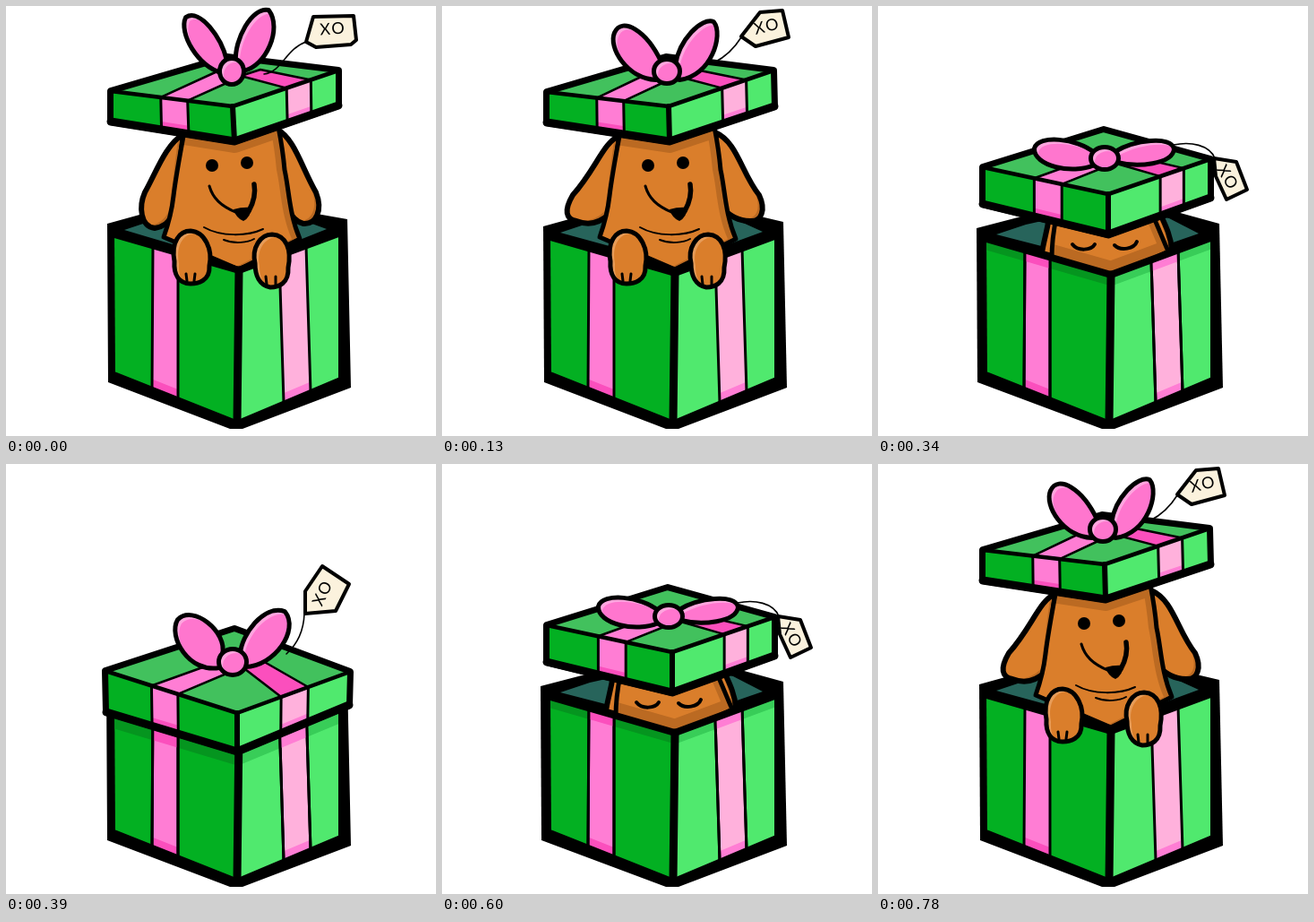
An HTML page with a canvas that plays this animation: 480 by 480 pixels, repeating every 910 ms.

```html
<!DOCTYPE html>
<html>
<head>
<meta charset="utf-8">
<style>
html, body { margin: 0; height: 100%; overflow: hidden; background: #fff }
canvas { display: block; width: 480px; height: 480px }
</style>
</head>
<body>
<canvas id="stage" width="480" height="480"></canvas>
<script>
const ctx = document.getElementById('stage').getContext('2d');
const GREEN = '#03b022', LIGHT_GREEN = '#50e96e', LID_TOP = '#42c15d';
const PINK = '#ff7dd4', PALE_PINK = '#ffb1dc', HOT_PINK = '#fb4fbd';
const BROWN = '#da7e2b', DARK_BROWN = '#bb6a22', LIGHT_BROWN = '#e79c58';

const openFace = {
  head: 'M199 140C193 172 189 195 187 212C185 230 181 244 176 258L260 294 328 260C316 232 316 205 311 183Q309 160 304 135Z',
  eyes: [[230, 178], [269, 175]],
  mouth: ['M227 201C231 215 240 223 256 230', 'M277 199C279 210 276 220 271 229'],
  nose: 'M254 227Q264 224 274 225Q273 236 265 240Q257 237 254 227Z',
  chin: 'M221 247C240 258 270 257 287 249M243 261C255 266 270 264 277 260',
  paws: ['M188 285C184 263 194 251 206 251C222 252 231 272 227 290C228 307 214 310 206 310C193 310 187 300 188 285Z',
         'M278 287C274 270 284 255 297 255C313 256 319 272 315 292C316 310 304 314 295 314C283 312 278 301 278 287Z'],
  toes: 'M201 299L202 307M211 299L210 307M290 302L291 311M301 302L301 311'
};

// lid: left, back, right, front top corners, then left, front, right bottom corners
const poses = {
  high: {
    rim: 0, side: 0,
    lid: [[117, 95], [247, 57], [371, 72], [253, 112], [117, 129], [255, 151], [371, 111]],
    knot: [252, 73, 13, 14],
    bow: ['M241 74C215 68 193 30 201 13C216 3 240 35 246 61Z',
          'M257 62C255 38 275 1 293 5C308 25 290 67 265 72Z'],
    tag: [[335, 40], [343, 12], [388, 11], [391, 38], [385, 43], [346, 46]],
    text: [365, 26, -4], string: 'M288 76C308 74 312 48 335 40',
    dog: { ...openFace, ears: [
      'M198 143C178 155 168 185 155 208C148 224 150 246 166 248Q180 246 187 232Z',
      'M303 138C322 148 330 180 346 208C354 228 346 244 332 243Q322 241 314 226Z'] }
  },
  up: {
    rim: 3, side: 0,
    lid: [[117, 96], [250, 57], [370, 72], [253, 112], [117, 130], [254, 151], [371, 112]],
    knot: [251, 73, 14, 13],
    bow: ['M239 82C206 80 186 46 193 30C201 12 228 28 244 62Z',
          'M261 66C265 38 290 13 303 18C314 32 300 78 265 82Z'],
    tag: [[334, 34], [355, 7], [380, 5], [387, 35], [350, 45]],
    text: [363, 23, -14], string: 'M304 63Q322 54 334 35',
    dog: { ...openFace, ears: [
      'M198 145C180 152 172 182 146 211C136 228 138 238 150 240Q170 248 187 232Z',
      'M305 141C330 152 334 186 354 211C362 228 356 240 346 240Q326 241 312 224Z'] }
  },
  peek: {
    rim: 5, side: -3, shade: 12,
    lid: [[117, 180], [252, 138], [371, 171], [257, 210], [117, 221], [257, 255], [371, 214]],
    knot: [253, 170, 15, 12],
    bow: ['M241 164C222 148 179 144 175 159C174 178 217 188 241 177Z',
          'M265 163C286 150 328 145 330 160C328 176 290 180 267 174Z'],
    tag: [[375, 170], [400, 174], [412, 205], [389, 216], [377, 190]],
    text: [390, 192, 58], string: 'M330 155C349 151 370 155 376 170',
    dog: {
      head: 'M199 236C195 255 194 265 194 282L260 304 324 274C317 258 312 245 306 232Z',
      ears: ['M191 236C188 255 185 262 183 276L205 282 205 236Z',
             'M315 232C322 247 327 258 328 272L312 276 305 232Z'],
      lids: 'M217 266C223 274 238 273 242 266M264 267C271 274 286 271 289 263'
    }
  },
  shut: {
    rim: 0, side: -1, shade: 15, closed: true, split: [.35, .55, .39, .63],
    lid: [[111, 231], [255, 184], [384, 232], [258, 278], [112, 277], [258, 321], [383, 269]],
    knot: [253, 221, 15, 14],
    bow: ['M238 227C205 233 181 193 192 174C209 157 247 188 241 212Z',
          'M262 212C263 191 288 157 311 165C327 185 300 225 267 226Z'],
    tag: [[334, 142], [353, 114], [383, 134], [368, 164], [334, 167]],
    text: [354, 144, -64], string: 'M313 212Q332 195 333 167'
  },
  rise: {
    rim: 1, side: 0,
    lid: [[117, 128], [252, 86], [369, 112], [253, 152], [117, 166], [256, 190], [370, 152]],
    knot: [253, 111, 15, 12],
    bow: ['M239 106C222 85 188 78 180 93C177 114 207 123 239 117Z',
          'M267 102C285 87 318 83 323 97C321 115 289 122 269 115Z'],
    tag: [[364, 95], [390, 88], [409, 115], [394, 135], [366, 112]],
    text: [384, 111, 40], string: 'M328 94Q348 91 364 95',
    dog: {
      head: 'M196 175C194 205 192 235 187 270L260 297 322 270C318 240 320 205 312 175Z',
      ears: ['M188 183C178 205 171 233 174 263L195 270 203 183Z',
             'M318 176C328 203 336 230 334 257L312 262 305 176Z'],
      lids: 'M217 210C223 219 238 217 240 210M264 212C271 219 285 215 288 208',
      mouth: ['M230 238C233 255 244 264 254 267', 'M281 235C280 250 275 262 268 273'],
      nose: 'M249 267Q259 264 270 269Q266 281 258 281Q251 277 249 267Z',
      paws: ['M183 289C177 259 208 240 224 260C235 277 220 283 207 280C204 292 190 299 183 289Z',
             'M277 277C279 256 309 245 321 266C328 286 320 300 306 296C298 291 296 281 277 277Z'],
      toes: 'M210 262L219 265M208 270L217 273M284 263L293 266M285 271L294 273'
    }
  }
};
const sequence = ['high', 'up', 'peek', 'shut', 'peek', 'rise', 'up'];
const STEP = 130;

const poly = (...pts) => new Path2D('M' + pts.join('L') + 'Z');
const line = (...pts) => new Path2D('M' + pts.join('L'));
const mix = (a, b, t) => [a[0] + (b[0] - a[0]) * t, a[1] + (b[1] - a[1]) * t];
const move = (p, dx, dy) => [p[0] + dx, p[1] + dy];
const rimCorners = rim => [[121, 255 + rim], [260, 295 + rim], [371, 254 + rim]];

function fill(path, color) {
  ctx.fillStyle = color;
  ctx.fill(path);
}
function stroke(path, width, color = '#000') {
  ctx.lineWidth = width;
  ctx.strokeStyle = color;
  ctx.stroke(path);
}
function inside(path, draw) {
  ctx.save();
  ctx.clip(path);
  draw();
  ctx.restore();
}
function ink(path, color, width) {
  fill(path, color);
  stroke(path, width);
}
// Leaves a crescent of edgeColor on the side away from (dx, dy)
function shaded(path, color, edgeColor, dx, dy) {
  fill(path, edgeColor);
  inside(path, () => {
    ctx.translate(dx, dy);
    fill(path, color);
  });
}
function ribbon(path, color, shadeColor, shadeLine, depth) {
  fill(path, color);
  inside(path, () => stroke(shadeLine, depth * 2, shadeColor));
  stroke(path, 3);
}

function drawBack({ rim, side }) {
  fill(poly([113 + side, 243 + rim], [160, 230 + rim], [255, 212], [330, 229], [381, 238 + rim],
    [385, 426], [264, 472], [250, 472], [114 + side, 420]), '#000');
  fill(poly([132, 250 + rim], [165, 239 + rim], [255, 224], [325, 237], [358, 249 + rim], [260, 288]), '#27645b');
}

function drawFront({ rim, shade, closed, lid }) {
  const [L, F, R] = rimCorners(rim);
  const edge = closed ? line(lid[4], lid[5], lid[6]) : line(L, F, R);
  const base = line([122, 411], [258, 465], [372, 417]);
  const left = poly(L, F, [258, 464], [122, 411]);
  const right = poly(F, R, [371, 417], [258, 464]);
  fill(left, GREEN);
  fill(right, LIGHT_GREEN);
  if (shade) {
    inside(left, () => stroke(edge, shade * 2, '#05951f'));
    inside(right, () => stroke(edge, shade * 2, '#38cd58'));
  }
  const leftBand = poly([164, 267 + rim], [192, 276 + rim], [192, 439], [163, 428]);
  const rightBand = poly([305, 279 + rim], [335, 268 + rim], [340, 431], [310, 443]);
  ribbon(leftBand, PINK, HOT_PINK, base, 10);
  ribbon(rightBand, PALE_PINK, PINK, base, 10);
  if (shade) {
    inside(leftBand, () => stroke(edge, shade * 2, HOT_PINK));
    inside(rightBand, () => stroke(edge, shade * 2, PINK));
    stroke(leftBand, 3);
    stroke(rightBand, 3);
  }
  stroke(line(L, F, R), 8);
  stroke(line(F, [258, 465]), 9);
  stroke(base, 5);
}

function drawDog({ dog, lid, rim }) {
  for (const d of dog.ears) {
    const ear = new Path2D(d);
    shaded(ear, BROWN, DARK_BROWN, -5, -3);
    stroke(ear, 6);
  }
  const head = new Path2D(dog.head);
  shaded(head, BROWN, DARK_BROWN, -9, 0);
  inside(head, () => dog.paws
    ? stroke(line(lid[4], lid[5], lid[6]), 26, DARK_BROWN)
    : stroke(line(...rimCorners(rim)), 30, DARK_BROWN));
  stroke(head, 5);
  for (const [x, y] of dog.eyes || []) {
    const eye = new Path2D();
    eye.arc(x, y, 7, 0, 7);
    fill(eye, '#000');
  }
  if (dog.lids) stroke(new Path2D(dog.lids), 4);
  if (dog.mouth) {
    stroke(new Path2D(dog.mouth[0]), 3);
    stroke(new Path2D(dog.mouth[1]), 5.5);
    fill(new Path2D(dog.nose), '#000');
  }
  if (dog.chin) stroke(new Path2D(dog.chin), 2);
}

function drawPaws({ paws = [], toes }) {
  for (const d of paws) {
    const paw = new Path2D(d);
    shaded(paw, BROWN, LIGHT_BROWN, 5, 3);
    stroke(paw, 5);
  }
  if (toes) stroke(new Path2D(toes), 3);
}

function drawLid({ lid, knot, split = [.41, .63, .51, .74] }) {
  const [L, B, R, F, l, f, r] = lid, [a, b, c, d] = split;
  const center = knot.slice(0, 2);
  const bottom = line(l, f, r);
  ink(poly(L, B, R, r, f, l), '#000', 8);
  fill(poly(L, B, R, F), LID_TOP);
  fill(poly(L, F, f, l), GREEN);
  fill(poly(F, R, r, f), LIGHT_GREEN);
  ink(poly(mix(L, F, a), mix(L, F, b), move(center, 12, 5), move(center, -14, -1)), PINK, 2.5);
  ink(poly(mix(F, R, c), mix(F, R, d), move(center, 32, -2), move(center, 10, 5)), HOT_PINK, 2.5);
  ribbon(poly(mix(L, F, a), mix(L, F, b), mix(l, f, b), mix(l, f, a)), PINK, HOT_PINK, bottom, 9);
  ribbon(poly(mix(F, R, c), mix(F, R, d), mix(f, r, d), mix(f, r, c)), PALE_PINK, PINK, bottom, 9);
  stroke(line(L, F, R), 4.5);
  stroke(line(F, f), 6);
  stroke(poly(L, B, R, r, f, l), 6);
  stroke(bottom, 9);
}

function drawBow({ bow, knot: [x, y, rx, ry] }) {
  const knotPath = new Path2D();
  knotPath.ellipse(x, y, rx, ry, 0, 0, 7);
  for (const path of [...bow.map(d => new Path2D(d)), knotPath]) {
    stroke(path, 6);
    shaded(path, '#ff76ce', '#ffa6df', 4, 4);
    stroke(path, 4);
  }
}

function drawTag({ tag, text: [x, y, angle], string }) {
  stroke(new Path2D(string), 1.6);
  ink(poly(...tag), '#fbf2dd', 4);
  ctx.save();
  ctx.translate(x, y);
  ctx.rotate(angle * Math.PI / 180);
  ctx.fillStyle = '#000';
  ctx.fillText('XO', 0, 0);
  ctx.restore();
}

function draw(pose) {
  ctx.fillStyle = '#fff';
  ctx.fillRect(0, 0, 480, 480);
  drawBack(pose);
  if (pose.dog) drawDog(pose);
  drawFront(pose);
  if (pose.dog) drawPaws(pose.dog);
  drawLid(pose);
  drawTag(pose);
  drawBow(pose);
}

ctx.lineJoin = ctx.lineCap = 'round';
ctx.font = '18px Lato, sans-serif';
ctx.letterSpacing = '2px';
ctx.textAlign = 'center';
ctx.textBaseline = 'middle';

function tick() {
  draw(poses[sequence[Math.floor(performance.now() / STEP) % sequence.length]]);
  requestAnimationFrame(tick);
}
tick();
</script>
</body>
</html>
```
